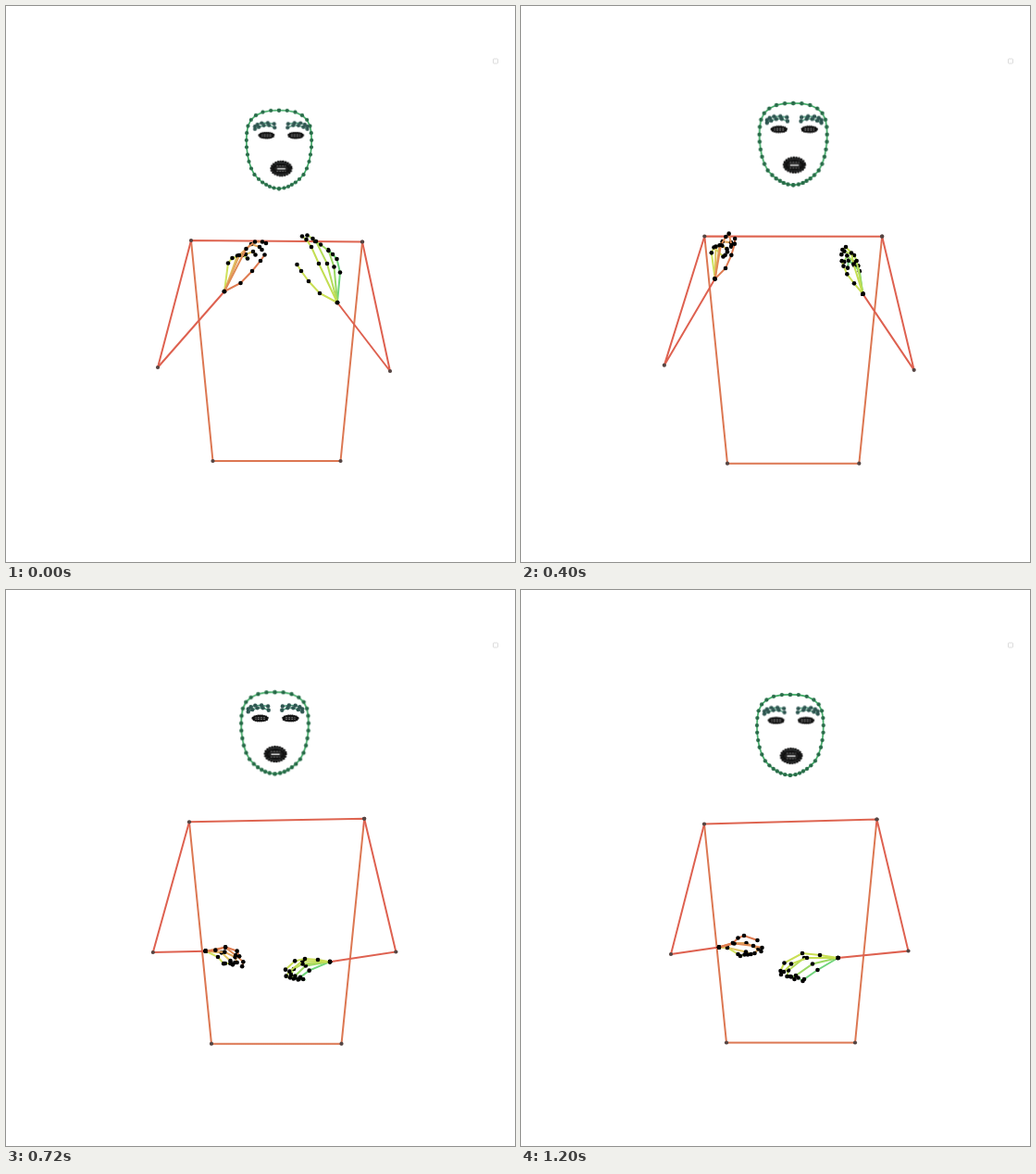
Animation of 550x600 px, one loop 1.28 s. Source, as an HTML page without scripts:

```html
<!DOCTYPE html>
<html lang="en">
<head>
<meta charset="utf-8">
<title>Pose skeleton</title>
<style>
html, body { margin: 0; width: 100%; height: 100%; overflow: hidden; background: #fff; }
svg { display: block; width: 100%; height: 100%; }
path { fill: none; }
.move { animation: 1280ms steps(3) infinite; }
.body path { stroke-width: 2; }
#arms { stroke: #de6150; marker-start: url(#joint); marker-mid: url(#joint); }
#torso { stroke: url(#warm); marker-mid: url(#joint); }
.hand path { stroke-width: 2; marker: url(#tip); }
.outline { stroke: #38a85f; stroke-width: 1.6; marker: url(#leaf); }
.brow { stroke: #459a78; stroke-width: 1.3; marker: url(#slate); }
.beads { stroke: #111; stroke-linecap: round; }
.glint { stroke: #aaa; stroke-width: .7; stroke-dasharray: 1.6 1.4; }

/* Every interval advances in 80 ms steps: three by default, two where marked. */
@keyframes torso {
  0% { d: path("M200 253L385 254.5 361.5 491 223.5 491Z") }
  18.75% { d: path("M200 251.5L388.5 252 364 492 224 492Z") }
  37.5% { d: path("M197.5 247L391 247 366 494.5 222.5 494.5Z"); animation-timing-function: steps(2) }
  50% { d: path("M197 249.5L388 246.5 363 491.5 221 491.5Z") }
  68.75% { d: path("M200 252L385.5 247.5 361.5 486 224 486Z"); animation-timing-function: steps(2) }
  81.25% { d: path("M198.5 252.5L385 247.5 361 488 222.5 488Z"); animation-timing-function: steps(2) }
  93.75%, to { d: path("M198 252.5L384.5 247.5 361 488.5 222 488.5Z") }
}
@keyframes arms {
  0% { d: path("M200 253L164 390 236 308M385 254.5L415 394 358 320") }
  18.75% { d: path("M200 251.5L157.5 387 217 291M388.5 252L422 393.5 363 312") }
  37.5% { d: path("M197.5 247L153.5 388 206 296M391 247L426 392.5 372.5 310"); animation-timing-function: steps(2) }
  50% { d: path("M197 249.5L159.5 392.5 216 397M388 246.5L420.5 392.5 352 410") }
  68.75% { d: path("M200 252L157.5 388 215 375M385.5 247.5L423 386.5 346 383.5"); animation-timing-function: steps(2) }
  81.25% { d: path("M198.5 252.5L161 391.5 214.5 383M385 247.5L419.5 388.5 342.5 392"); animation-timing-function: steps(2) }
  93.75%, to { d: path("M198 252.5L162 393 214 385.5M384.5 247.5L418.5 389.5 342.5 397") }
}
@keyframes head {
  0% { transform: translate(295px, 154.8px) scale(1, 1) }
  18.75% { transform: translate(294.5px, 152px) scale(1.014, 1.03) }
  37.5% { transform: translate(294px, 147.5px) scale(1.05, 1.053); animation-timing-function: steps(2) }
  50% { transform: translate(290px, 152.5px) scale(1.045, 1.053) }
  68.75% { transform: translate(291.6px, 157.8px) scale(1.01, 1.024); animation-timing-function: steps(2) }
  81.25% { transform: translate(291.2px, 156.8px) scale(1.015, 1.026) }
  93.75%, to { transform: translate(290.9px, 156.4px) scale(1.02, 1.03) }
}
@keyframes turn {
  0% { transform: translate(2.3px) }
  18.75% { transform: translate(1.5px) }
  37.5% { transform: translate(.8px); animation-timing-function: steps(2) }
  50% { transform: translate(.1px) }
  68.75%, to { transform: translate(.9px) }
}
@keyframes jaw {
  0% { transform: translateY(0) }
  18.75% { transform: translateY(1px) }
  68.75%, to { transform: translateY(1.4px) }
}

/* Left hand, thumb to little finger */
@keyframes l1 {
  0% { d: path("M236 308L253.5 299 266 286 275 275 279.5 268.5") }
  18.75% { d: path("M217 291L234 281 244 266.5 249.5 254 250.5 247") }
  37.5% { d: path("M206 296L214.5 284 219 270 221.5 258 221.5 253"); animation-timing-function: steps(2) }
  50% { d: path("M216 397L228.5 396 241 393 252.5 401 250 406") }
  68.75% { d: path("M215 375L222 374 229.5 370 244 367 256.5 374"); animation-timing-function: steps(2) }
  81.25% { d: path("M214.5 383L229 380 235.5 375 242 373 255.5 379"); animation-timing-function: steps(2) }
  93.75%, to { d: path("M214 385.5L229 381 234.5 375.5 241 373 255.5 378") }
}
@keyframes l2 {
  0% { d: path("M236 308L259.5 262 269 254.5 277 254.5 281 256") }
  18.75% { d: path("M217 291L230 250 237 237 242 235 248.5 238.5") }
  37.5% { d: path("M206 296L209 262 213.5 255 216 251 217 268"); animation-timing-function: steps(2) }
  50% { d: path("M216 397L237 395 247.5 402 254.5 410 253.5 415") }
  68.75% { d: path("M215 375L237 367 250 378.5 260 384 258.5 388.5"); animation-timing-function: steps(2) }
  81.25% { d: path("M214.5 383L231 381 251 384.5 259.5 387 259 391.5"); animation-timing-function: steps(2) }
  93.75%, to { d: path("M214 385.5L230.5 381.5 251 384 260.5 386 259.5 390") }
}
@keyframes l3 {
  0% { d: path("M236 308L252 269 265 257 274 260 276.5 263") }
  18.75% { d: path("M217 291L229.5 251 231 242.5 243 245.5 249.5 243") }
  37.5% { d: path("M206 296L207 262 211 260 219 260 216 268"); animation-timing-function: steps(2) }
  50% { d: path("M216 397L238.5 398 249 405 248 412 243 409.5") }
  68.75% { d: path("M215 375L232 376 245 379 253 382 256 387"); animation-timing-function: steps(2) }
  81.25% { d: path("M214.5 383L230 380 244 381 256 389 252 393.5"); animation-timing-function: steps(2) }
  93.75%, to { d: path("M214 385.5L229 381 243.5 381 256.5 387.5 252.5 392") }
}
@keyframes l4 {
  0% { d: path("M236 308L250 269.5 259 268 267 265 269.5 268.5") }
  18.75% { d: path("M217 291L223.5 249 232 252 237.5 250.5 243 252") }
  37.5% { d: path("M206 296L204 265 210 262 215 268 213 272"); animation-timing-function: steps(2) }
  50% { d: path("M216 397L233 399 243 409.5 239 410.5 244 412") }
  68.75% { d: path("M215 375L232.5 376 241.5 381.5 251 388 247 389"); animation-timing-function: steps(2) }
  81.25% { d: path("M214.5 383L223 384 242.5 390.5 248 394 245 394"); animation-timing-function: steps(2) }
  93.75%, to { d: path("M214 385.5L223 386 243 390.5 248.5 393 245 393.5") }
}
@keyframes l5 {
  0% { d: path("M236 308L240 277.5 244.5 272 255.5 269 261 272.5") }
  18.75% { d: path("M217 291L213.5 257 218.5 251.5 231.5 257.5 238 257.5") }
  37.5% { d: path("M206 296L202 271 203.5 265 212 277 212 274.5"); animation-timing-function: steps(2) }
  50% { d: path("M216 397L228 403 236 412 235.5 411 242 411") }
  68.75% { d: path("M215 375L231 382 233.5 385.5 239.5 387 243 387"); animation-timing-function: steps(2) }
  81.25% { d: path("M214.5 383L223 384 234 393 236.5 395 241 394"); animation-timing-function: steps(2) }
  93.75%, to { d: path("M214 385.5L223 386 234.5 393 237 395 241.5 393.5") }
}

/* Right hand, thumb to little finger */
@keyframes r1 {
  0% { d: path("M358 320L339 310 327 297 319 286 314.5 279") }
  18.75% { d: path("M363 312L346 302 335 288 327.5 276 324 269.5") }
  37.5% { d: path("M372.5 310L367 298 361 290 359 283 358 278"); animation-timing-function: steps(2) }
  50% { d: path("M352 410L342.5 407 330.5 408 323 406.5 310 416") }
  68.75% { d: path("M346 383.5L326 383 308 378 290.5 388 286 397"); animation-timing-function: steps(2) }
  81.25% { d: path("M342.5 392L324.5 390 305.5 387.5 287 398.5 282.5 407"); animation-timing-function: steps(2) }
  93.75%, to { d: path("M342.5 397L323 394 304 392 284.5 402.5 280.5 411") }
}
@keyframes r2 {
  0% { d: path("M358 320L338 278 330 260 324.5 252 320 248.5") }
  18.75% { d: path("M363 312L344 269.5 339 257.5 334 255 328 255") }
  37.5% { d: path("M372.5 310L367 283 366 271 359.5 262.5 357 267"); animation-timing-function: steps(2) }
  50% { d: path("M352 410L323.5 410.5 311 421 311 424 315.5 426.5") }
  68.75% { d: path("M346 383.5L314 380 297 393 286 402 290 402"); animation-timing-function: steps(2) }
  81.25% { d: path("M342.5 392L310.5 392 295 399.5 287 408 282.5 411.5"); animation-timing-function: steps(2) }
  93.75%, to { d: path("M342.5 397L309 397 292 403.5 284 412 281 415") }
}
@keyframes r3 {
  0% { d: path("M358 320L347 278 335 254 331.5 251 325.5 247.5") }
  18.75% { d: path("M363 312L352 269 346 263 332 262 325 256.5") }
  37.5% { d: path("M372.5 310L368 278 367 272 358 266 357 274"); animation-timing-function: steps(2) }
  50% { d: path("M352 410L320 413 312 420 314 426 319 428") }
  68.75% { d: path("M346 383.5L321.5 384.5 309 387 296 393.5 294 402.5"); animation-timing-function: steps(2) }
  81.25% { d: path("M342.5 392L307.5 393 291 405.5 289 412.5 294 414"); animation-timing-function: steps(2) }
  93.75%, to { d: path("M342.5 397L306 397 289 410.5 287.5 417 291 417") }
}
@keyframes r4 {
  0% { d: path("M358 320L354.5 281.5 348.5 264 340 257.5 334 254") }
  18.75% { d: path("M363 312L358 273 346 276 339 268 330 266") }
  37.5% { d: path("M372.5 310L367.5 284 367 277 359 270 359 281"); animation-timing-function: steps(2) }
  50% { d: path("M352 410L325 416 316 426 320 425.5 322 429") }
  68.75% { d: path("M346 383.5L321.5 384.5 305 397.5 297 404 303 403.5"); animation-timing-function: steps(2) }
  81.25% { d: path("M342.5 392L316 398 298.5 411 293 414 297.5 416"); animation-timing-function: steps(2) }
  93.75%, to { d: path("M342.5 397L315 403.5 297 416 292 417.5 295.5 420") }
}
@keyframes r5 {
  0% { d: path("M358 320L361 287.5 357.5 273 353 268 348 263") }
  18.75% { d: path("M363 312L362.5 278.5 354 271 348 274 337 272") }
  37.5% { d: path("M372.5 310L367.5 290 363 284 357 275 361 288"); animation-timing-function: steps(2) }
  50% { d: path("M352 410L327.5 421 319 427 325 428 322 427") }
  68.75% { d: path("M346 383.5L328 390 316 399.5 313.5 404 306 405"); animation-timing-function: steps(2) }
  81.25% { d: path("M342.5 392L322 404.5 307.5 415 306.5 417 301 414.5"); animation-timing-function: steps(2) }
  93.75%, to { d: path("M342.5 397L320.5 410 306 420 304.5 422 299.5 418.5") }
}
</style>
</head>
<body>
<svg viewBox="0 0 550 600">
  <defs>
    <linearGradient id="warm" gradientUnits="userSpaceOnUse" x1="0" y1="240" x2="0" y2="500">
      <stop offset=".06" stop-color="#de6450"/>
      <stop offset=".06" stop-color="#dc7752"/>
    </linearGradient>
    <g id="dot"><circle r="2.1"/></g>
    <marker id="joint" markerUnits="userSpaceOnUse" overflow="visible"><use href="#dot" fill="#554543"/></marker>
    <marker id="tip" markerUnits="userSpaceOnUse" overflow="visible"><circle r="2.3"/></marker>
    <marker id="leaf" markerUnits="userSpaceOnUse" overflow="visible"><use href="#dot" fill="#276b48"/></marker>
    <marker id="slate" markerUnits="userSpaceOnUse" overflow="visible"><use href="#dot" fill="#2e5550"/></marker>

    <g id="side">
      <path class="outline" d="M0-42.2L8.8-42 17.5-40.3 25-36.8 30.2-32 33.5-25.3 34.8-17.8 35.2-10 35-2.5 34 5.5 32.5 13 30 20.5 26.5 27.2 22 32 17.8 35.5 13.8 38 10 40 5.5 41.5 0 42.3"/>
    </g>
    <g id="eye">
      <path class="brow" d="M7.6-27.7L14.4-28.6 21-28.5 25.6-27 28.3-24.8M7-23.6L13-26 18.7-25.9 24-24.2 28.3-22"/>
      <g transform="translate(15.8 -15.2)">
        <ellipse class="beads" rx="7.8" ry="2.7" fill="#1c1c1c" stroke-width="2.4" stroke-dasharray="0 2"/>
        <path class="glint" d="M-5-.8H5M-5 1H5"/>
      </g>
    </g>
  </defs>

  <rect x="526.5" y="57" width="5" height="5" rx=".8" fill="#fff" stroke="#d4d4d4" stroke-width=".8"/>

  <g class="move" style="animation-name: head">
    <use href="#side"/>
    <use href="#side" transform="scale(-1 1)"/>
    <g class="move" style="animation-name: turn">
      <use href="#eye"/>
      <use href="#eye" transform="scale(-1 1)"/>
      <g class="move" style="animation-name: jaw">
        <g transform="translate(.2 20.6)">
          <ellipse class="beads" rx="11" ry="7.6" fill="#3a3d3e" stroke="#26302f" stroke-width="2.5" stroke-dasharray="0 2.7"/>
          <ellipse class="beads" rx="8.8" ry="4.4" fill="#222" stroke-width="3" stroke-dasharray="0 2"/>
          <path class="glint" d="M-5-2.8H5M-5 3H5"/>
          <path d="M-4.5.2H4.5" stroke="#eee" stroke-width="1.3"/>
        </g>
      </g>
    </g>
  </g>

  <g class="body">
    <path id="torso" class="move" style="animation-name: torso"/>
    <path id="arms" class="move" style="animation-name: arms"/>
  </g>

  <g class="hand">
    <path class="move" style="animation-name: l5" stroke="#cfe25c"/>
    <path class="move" style="animation-name: l4" stroke="#e0c662"/>
    <path class="move" style="animation-name: l3" stroke="#e2a75c"/>
    <path class="move" style="animation-name: l2" stroke="#e08c56"/>
    <path class="move" style="animation-name: l1" stroke="#de7a50"/>
  </g>
  <g class="hand">
    <path class="move" style="animation-name: r5" stroke="#6fd47a"/>
    <path class="move" style="animation-name: r4" stroke="#9bd863"/>
    <path class="move" style="animation-name: r3" stroke="#b4dc5a"/>
    <path class="move" style="animation-name: r2" stroke="#c3de52"/>
    <path class="move" style="animation-name: r1" stroke="#cadf55"/>
  </g>
</svg>
</body>
</html>
```
